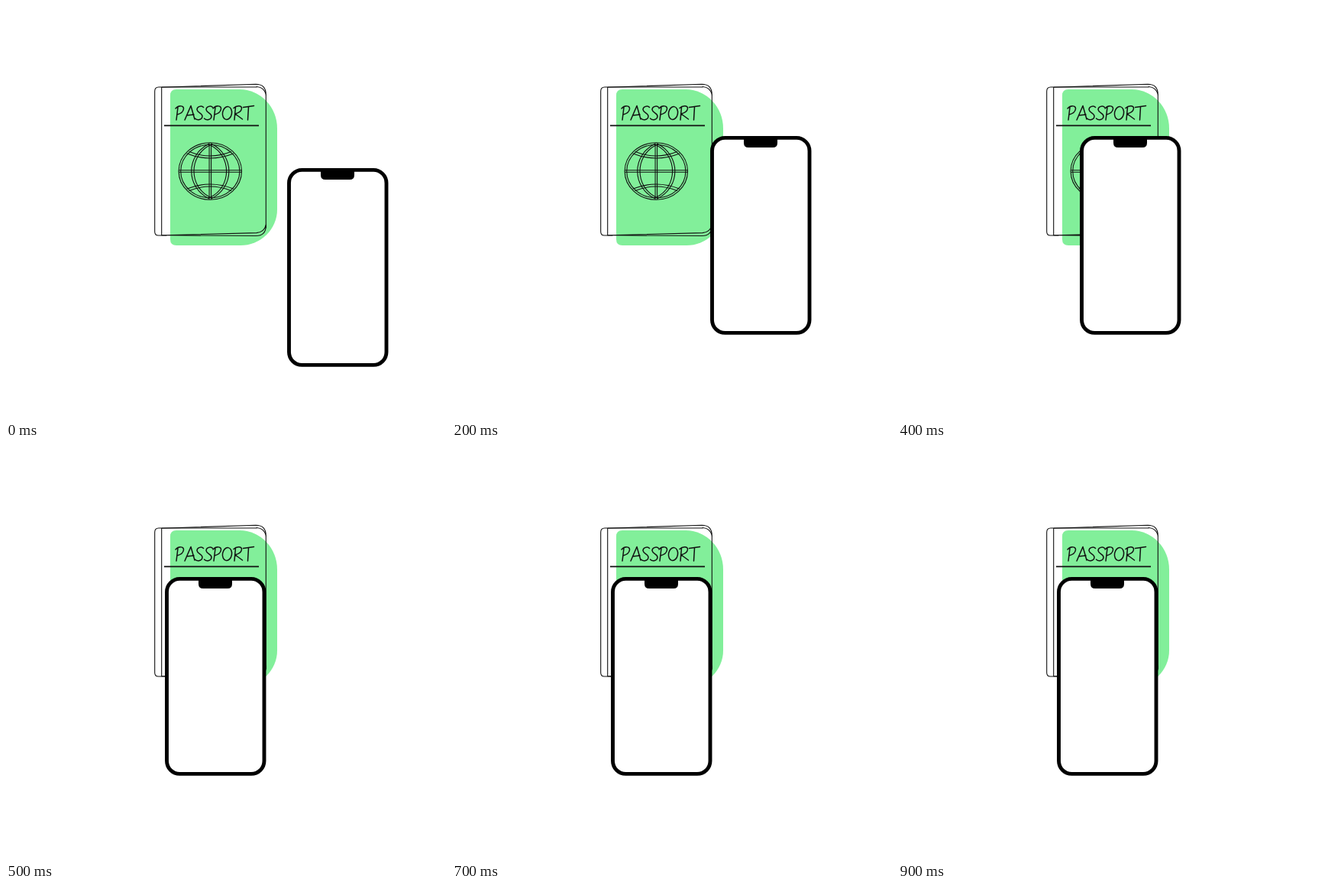
Recreate the animation shown at these times as an HTML page. Size 576 px wide and 540 px high, loop 1000 ms.

```html
<!DOCTYPE html>
<html lang="en">
<head>
<meta charset="utf-8">
<title>Passport and phone</title>
<style>
  html, body { margin: 0; width: 100%; height: 100%; overflow: hidden; background: #fff; }
  svg { display: block; width: 576px; height: 540px; }
  .ink { fill: none; stroke: #111; stroke-width: 1.1; stroke-linecap: round; stroke-linejoin: round; }
  .letters { stroke-width: 1.5; }
  .phone { animation: slide 1s step-end infinite; }
  .mark { font: 500 33px Inter, sans-serif; text-anchor: middle; animation: blink 1s step-end infinite; }
  @keyframes slide {
    0%   { transform: translate(368px, 212px); }
    10%  { transform: translate(353px, 191px); }
    20%  { transform: translate(338px, 170px); }
    30%  { transform: translate(268px, 170px); }
    40%  { transform: translate(238px, 170px); }
    50%, 100% { transform: translate(208px, 170px); }
  }
  @keyframes blink {
    0%, 70%, 90%, 100% { opacity: 0; }
    60%, 80% { opacity: 1; }
  }
</style>
</head>
<body>
<svg viewBox="0 0 576 540">
  <defs>
    <path id="p" d="M225 132.5L223 149M222 134C226 129.5 233 130 232.500 134.500C232 138.500 228 141 224 142"/>
    <path id="s" d="M258.500 132.500C256 129.500 250 131.500 250 135.500C250.500 140 257.500 140 257 144.500C256.500 149 250.500 150 247.500 147"/>
    <path id="parallel" d="M237 193Q267.300 205 297.600 193M240 190.500Q267.300 201.500 294.600 190.500"/>
  </defs>

  <path fill="#82ef9a" d="M223 109H306A49 51 0 0 1 355 160V266A48 47 0 0 1 307 313H223Q215 313 215 305V117Q215 109 223 109Z"/>

  <g class="ink">
    <path d="M340.300 116V290M328 106H200Q194.700 106 194.700 111.500V295Q194.700 300 199.500 300H210M203.700 106.500V299.500"/>
    <path d="M204 106.300L327 102.300Q340.300 102.300 340.300 116M328 105.500Q338 106 340.300 116"/>
    <path d="M204 299.800L328 296.600Q338 296 340.300 286M210 299.800L327 300.500Q340.300 300.500 340.300 287"/>
    <path stroke-width="1.8" stroke-linecap="butt" d="M207 156.300H331"/>
  </g>

  <text x="222" y="149" font-family="Inter, sans-serif" font-size="20" fill="none">PASSPORT</text>
  <g class="ink letters" aria-hidden="true">
    <use href="#p"/>
    <path d="M234 149L242 130.500L247 148M236.500 143L246 142"/>
    <use href="#s"/>
    <use href="#s" x="12"/>
    <use href="#p" x="49"/>
    <ellipse cx="289.500" cy="140" rx="6" ry="8.500" transform="rotate(10 289.500 140)"/>
    <path d="M300.500 132L299 149M298 133.500C302 129.500 309 130 308.500 134C308 138 304 140 300 141L309.500 148"/>
    <path d="M310.500 132.500L324.500 130.500M317.500 132L316.500 149"/>
  </g>

  <g class="ink">
    <ellipse cx="267.300" cy="216" rx="41.200" ry="37.200"/>
    <ellipse cx="267.300" cy="216" rx="38.600" ry="34.800"/>
    <path d="M226.500 214.700H308M226.500 217.200H308M266.100 180V252M268.600 180V252"/>
    <path d="M266 180C235 195 235 237 266 252M267 182C239 196 239 236 267 250"/>
    <path d="M268.600 180C299.600 195 299.600 237 268.600 252M267.600 182C295.600 196 295.600 236 267.600 250"/>
    <use href="#parallel"/>
    <use href="#parallel" transform="matrix(1 0 0 -1 0 432)"/>
  </g>

  <g class="phone">
    <rect x="2.500" y="2.400" width="127.500" height="255" rx="17" fill="#fff" stroke="#000" stroke-width="4.900"/>
    <path d="M44 2H88V9Q88 15 82 15H50Q44 15 44 9Z"/>
  </g>
  <text class="mark" x="275.500" y="263.500">?</text>
</svg>
</body>
</html>
```
